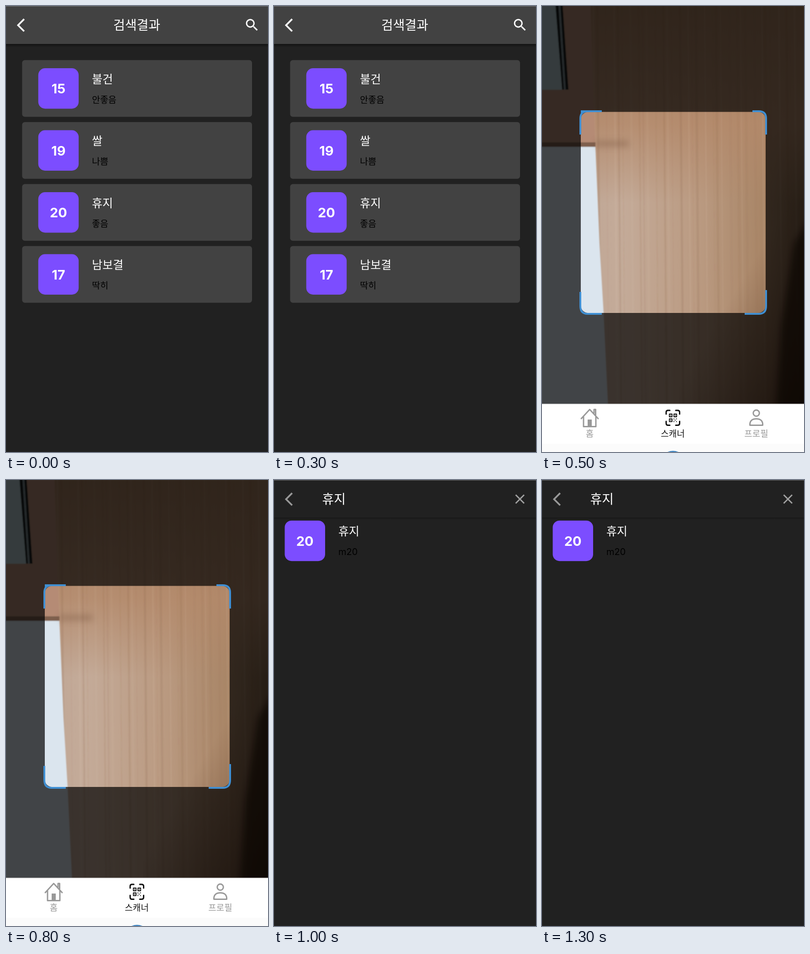
Write an HTML page that moves like this. It is 574x975 px and loops after 1.5 s.

```html
<!DOCTYPE html>
<html lang="ko">
<head>
<meta charset="utf-8">
<style>
  html, body { margin: 0; width: 100%; height: 100%; overflow: hidden; background: #212121; }
  svg { display: block; }
  text { font-family: "Noto Sans CJK KR", "Noto Sans CJK", sans-serif; fill: #fff; }
  .num { font: 700 29px Inter, sans-serif; text-anchor: middle; }
  .name { font-size: 25px; font-weight: 500; }
  .note { font-size: 19.5px; fill: #000; }
  .latin { font-family: Inter, sans-serif; font-size: 20px; }
  .bar { font-size: 28px; }
  .tab { font-size: 19px; font-weight: 500; text-anchor: middle; fill: #999; }
</style>
</head>
<body>
<svg width="574" height="975" viewBox="0 0 574 975">
  <defs>
    <path id="back" transform="translate(23.8 24.2) scale(1.475)" d="M11.67 3.87L9.9 2.1 0 12l9.9 9.9 1.77-1.77L3.54 12z"/>
    <linearGradient id="shadow" x2="0" y2="1">
      <stop stop-opacity=".45"/><stop offset="1" stop-opacity="0"/>
    </linearGradient>
    <linearGradient id="wood">
      <stop stop-color="#b9a08f"/><stop offset=".3" stop-color="#c4ab99"/>
      <stop offset=".6" stop-color="#ba9a81"/><stop offset=".85" stop-color="#a88566"/>
      <stop offset="1" stop-color="#836448"/>
    </linearGradient>
    <linearGradient id="warm" x2="0" y2="1">
      <stop stop-color="#a27b5c"/><stop offset=".6" stop-color="#b3896a" stop-opacity=".85"/>
      <stop offset="1" stop-color="#b3896a" stop-opacity="0"/>
    </linearGradient>
    <linearGradient id="dusk" x2="1" y2="1">
      <stop offset=".45" stop-color="#6b4630" stop-opacity="0"/><stop offset="1" stop-color="#4a2c1c" stop-opacity=".75"/>
    </linearGradient>
    <filter id="soft" filterUnits="userSpaceOnUse" x="-60" y="-60" width="700" height="1100"><feGaussianBlur stdDeviation="1.2"/></filter>
    <filter id="blur" filterUnits="userSpaceOnUse" x="-60" y="-60" width="700" height="1100"><feGaussianBlur stdDeviation="7"/></filter>
  </defs>

  <g class="scene">
    <rect width="574" height="975" fill="#212121"/>
    <rect y="83" width="574" height="7" fill="url(#shadow)"/>
    <rect width="574" height="83" fill="#424242"/>
    <rect width="574" height="1" fill="#777"/>
    <use href="#back" fill="#fff"/>
    <text class="bar" x="286.5" y="52.3" text-anchor="middle">검색결과</text>
    <path transform="translate(521.2 23.8) scale(1.475)" fill="#fff" d="M15.5 14h-.79l-.28-.27C15.41 12.59 16 11.11 16 9.5 16 5.91 13.09 3 9.5 3S3 5.91 3 9.5 5.91 16 9.5 16c1.61 0 3.09-.59 4.23-1.57l.27.28v.79l5 4.99L20.49 19l-4.99-5zm-6 0C7.01 14 5 11.99 5 9.5S7.01 5 9.5 5 14 7.01 14 9.5 11.99 14 9.5 14z"/>
    <g id="results"></g>
  </g>

  <g class="scene" visibility="hidden">
    <rect width="574" height="975" fill="url(#wood)"/>
    <rect width="574" height="430" fill="url(#warm)"/>
    <g id="grain" filter="url(#soft)"></g>
    <rect x="300" y="420" width="274" height="450" fill="url(#dusk)"/>
    <path filter="url(#blur)" fill="#1c0c02" opacity=".62" d="M600 440L552 520 524 700 512 900H600Z"/>
    <g filter="url(#soft)">
      <path fill="#b58b74" d="M-20-20H106L117 306H-20Z"/>
      <path fill="#b1c8cd" d="M-20-20H34L46 183H-20Z"/>
      <path fill="#181a1c" d="M28-20H44L58 183H44Z"/>
      <path fill="#7d8c92" d="M35-20H39L52 183H48Z"/>
      <path fill="#dbe5ee" d="M-20 308H117L126 520 135 671 146 900H-20Z"/>
      <path fill="#6d5140" opacity=".75" d="M-20 298H117V308H-20Z"/>
    </g>
    <path filter="url(#blur)" fill="#6d4a34" opacity=".3" d="M117 294H190V308H117Z"/>
    <path fill-rule="evenodd" opacity=".7" d="M0 0H574V870H0ZM101 231.5H474a16 16 0 0 1 16 16V655a16 16 0 0 1-16 16H101a16 16 0 0 1-16-16V247.5a16 16 0 0 1 16-16Z"/>
    <path fill="#3f8fd3" d="M85 228H101Q87 231 85 246Z"/>
    <path fill="none" stroke="#3f8fd3" stroke-width="4" d="M84 281V246Q84 230 100 230H131M461 230H475Q491 230 491 246V281M84 625V656Q84 673 100 673H131M444 673H475Q491 673 491 656V621"/>

    <rect y="870" width="574" height="105" fill="#fff"/>
    <rect y="957" width="574" height="18" fill="#fbfbfb"/>
    <rect y="869.5" width="574" height="1" fill="#ccc"/>
    <g fill="none" stroke="#999" stroke-width="3" stroke-linejoin="round" stroke-linecap="round">
      <path d="M86 902L104.500 882 123 902M91 898V919.500H118V898M114 890V882H117.500V894"/>
      <path fill="#999" stroke="none" d="M100 904H109V920H100Z"/>
      <circle cx="469.500" cy="890" r="6.700"/>
      <path d="M455.500 916.500C455 906 461 902.500 469.500 902.500S484 906 483.500 916.500Z"/>
      <g stroke="#111">
        <path d="M272 892V888Q272 884 276 884H280M293 884H297Q301.500 884 301.500 888V892M272 908V912Q272 916.500 276 916.500H280M293 916.500H297Q301.500 916.500 301.500 912V908"/>
        <path stroke-width="1.800" d="M279 892H285V898H279ZM289 892H295V898H289ZM279 902.500H285V908.500H279Z"/>
        <path stroke-width="2.200" d="M289 902.500h.1M294.500 902.500h.1M291.700 905.500h.1M289 908.500h.1M294.500 908.500h.1M282 895h.1M292 895h.1M282 905.500h.1"/>
      </g>
    </g>
    <text class="tab" x="104.500" y="942">홈</text>
    <text class="tab" x="286.500" y="942" style="fill:#111">스캐너</text>
    <text class="tab" x="469.500" y="942">프로필</text>
    <circle cx="287" cy="1002.500" r="30" fill="#3c82bf"/>
  </g>

  <g class="scene" visibility="hidden">
    <rect width="574" height="975" fill="#212121"/>
    <rect y="82" width="574" height="5" fill="url(#shadow)" opacity=".6"/>
    <rect width="574" height="1" fill="#666"/>
    <use href="#back" fill="#999"/>
    <text class="bar" x="105.500" y="52.300">휴지</text>
    <path d="M529.500 32.500L548 51M548 32.500L529.500 51" stroke="#a0a0a0" stroke-width="3"/>
    <g id="match"></g>
  </g>
</svg>
<script>
const $ = id => document.getElementById(id);

const item = (x, y, num, name, note, latin = '') => `
  <rect x="${x}" y="${y}" width="88.5" height="88.5" rx="15" fill="#7c4dff"/>
  <text class="num" x="${x + 44.2}" y="${y + 55}">${num}</text>
  <text class="name" x="${x + 117.5}" y="${y + 32.5}">${name}</text>
  <text class="note ${latin}" x="${x + 117.5}" y="${y + 75.7}">${note}</text>`;

$('results').innerHTML = [
  [15, '불건', '안좋음'], [19, '쌀', '나쁨'], [20, '휴지', '좋음'], [17, '남보결', '딱히']
].map((row, i) => {
  const y = 118.3 + i * 135.5;
  return `<rect x="35.3" y="${y}" width="503.7" height="124" rx="6" fill="#424242"/>` + item(70.7, y + 17.7, ...row);
}).join('');

$('match').innerHTML = item(23.5, 88.7, 20, '휴지', 'm20', 'latin');

// Faint vertical wood grain
$('grain').innerHTML = Array.from({ length: 34 }, (_, i) => {
  const x = 112 + i * 13.5 + 5 * Math.sin(i * 4.7), w = 3 + 2 * Math.sin(i * 2.3);
  return `<path d="M${x}-20L${x + 8} 900" stroke="${i % 3 ? '#80583e' : '#ead8c8'}" stroke-width="${w}" opacity="${0.1 + 0.06 * Math.sin(i * 1.9)}"/>`;
}).join('');

const scenes = document.querySelectorAll('.scene');
function draw() {
  const current = Math.floor(performance.now() % 1500 / 500);
  scenes.forEach((scene, i) => scene.setAttribute('visibility', i === current ? 'visible' : 'hidden'));
  requestAnimationFrame(draw);
}
draw();
</script>
</body>
</html>
```
